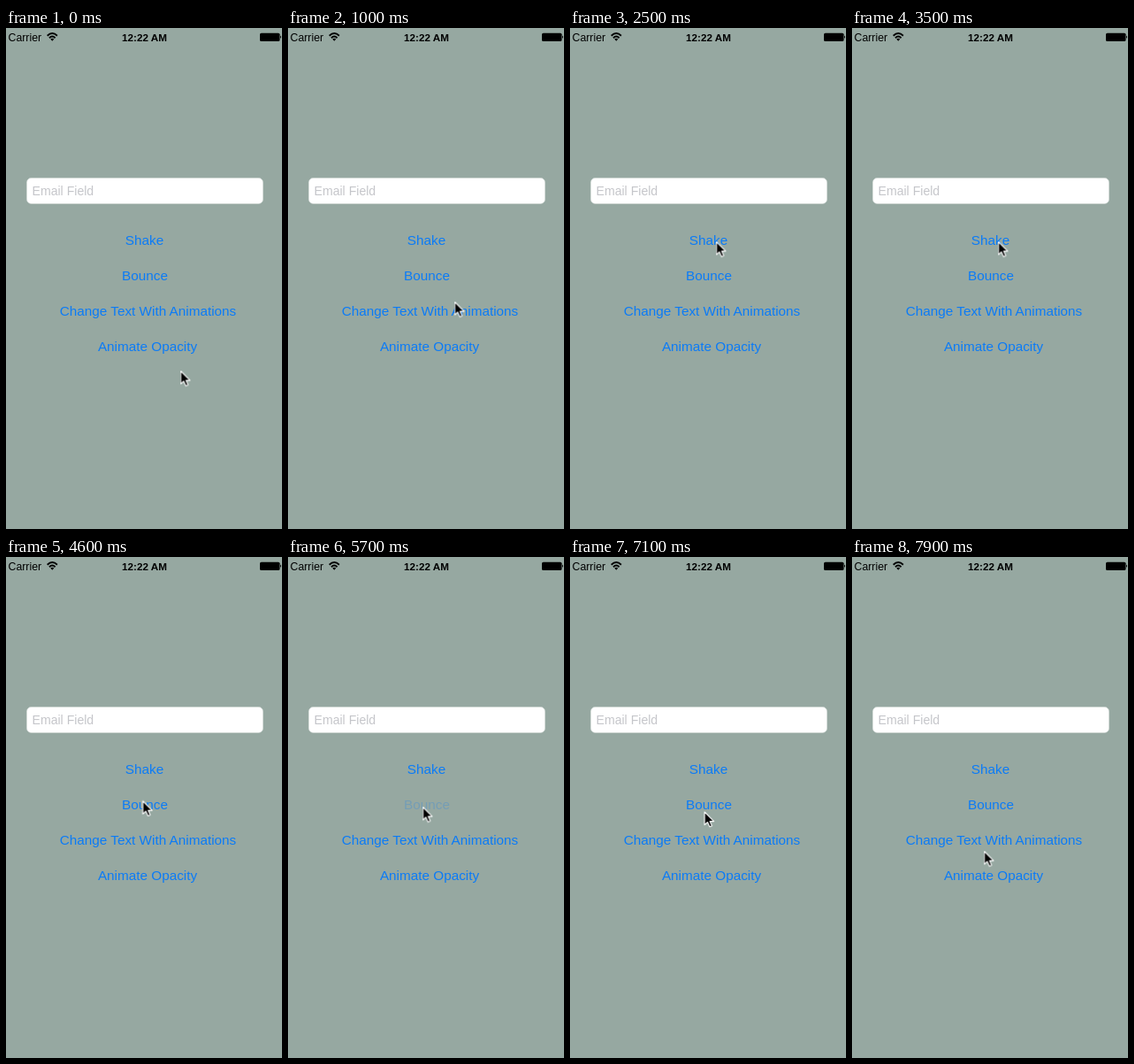
An HTML page for the animation above (8000 ms loop, 312 by 566 pixels).

```html
<!DOCTYPE html>
<html lang="en">
<head>
<meta charset="utf-8">
<title>Text field animations</title>
<style>
  html, body {
    margin: 0;
    width: 100%;
    height: 100%;
    overflow: hidden;
    background: #96a8a1;
  }
  svg {
    display: block;
    width: 312px;
    height: 566px;
    font-family: "Liberation Sans", Arial, Helvetica, sans-serif;
  }
  .status { font-size: 12.3px; }
  .clock { font-size: 11.7px; font-weight: bold; }
  .hint { font-size: 14.1px; fill: #c5c6ca; }
  .button { font-size: 15.3px; fill: #0b7bf7; }
  .clock, .button { text-anchor: middle; }

  .shake { animation: shake 8s linear infinite; }
  .bounce { animation: bounce 8s step-end infinite; }
  .tap { animation: tap 8s step-end infinite; }
  .tap.late { animation-delay: 2.9s; }
  .cursor { animation: move 8s infinite; }

  @keyframes shake {
    0%, 35.62% { transform: translateX(0); }
    35.625%, 37.5% { transform: translateX(-20px); }
    36.5625%, 38.4375% { transform: translateX(20px); }
    39.375% { transform: translateX(-10px); }
    40.3125% { transform: translateX(10px); }
    41.25% { transform: translateX(-5px); }
    42.1875% { transform: translateX(5px); }
    43.125%, 100% { transform: translateX(0); }
  }
  @keyframes bounce {
    0% { transform: translateY(0); }
    73.75% { transform: translateY(-5px); }
    75% { transform: translateY(3px); }
    76.25% { transform: translateY(9px); }
    77.5%, 100% { transform: translateY(0); }
  }
  @keyframes tap {
    0% { opacity: 1; }
    35% { opacity: .24; }
    36.25% { opacity: .5; }
    37.5% { opacity: .8; }
    38.75%, 100% { opacity: 1; }
  }
  /* The pointer advances once every 100 ms. */
  @keyframes move {
    0% { transform: translate(197.5px, 387.5px); animation-timing-function: step-end; }
    5% { transform: translate(197.5px, 387.5px); animation-timing-function: steps(6); }
    12.5% { transform: translate(188.5px, 309.5px); animation-timing-function: steps(3); }
    16.25% { transform: translate(187px, 305px); animation-timing-function: steps(9); }
    27.5% { transform: translate(166.5px, 243px); animation-timing-function: steps(3); }
    31.25% { transform: translate(165.5px, 241.5px); animation-timing-function: step-end; }
    51.25% { transform: translate(165.5px, 241.5px); animation-timing-function: steps(6); }
    58.75% { transform: translate(152.5px, 282.5px); animation-timing-function: step-end; }
    87.5% { transform: translate(152.5px, 282.5px); animation-timing-function: steps(9); }
    98.75%, 100% { transform: translate(149.5px, 332.5px); }
  }
</style>
</head>
<body>
<svg viewBox="0 0 312 566">
  <rect width="312" height="566" fill="#96a8a1"/>

  <text class="status" x="2.5" y="15">Carrier</text>
  <g fill="none" stroke="#000" stroke-width="1.9">
    <path d="M46.7 8.8Q52.3 3.4 57.9 8.8"/>
    <path d="M49 11.2Q52.3 8 55.6 11.2"/>
  </g>
  <path d="M50.3 12.6Q52.3 10.9 54.3 12.6L52.3 14.8Z"/>
  <text class="clock" x="156.5" y="14.6">12:22 AM</text>
  <rect x="287" y="5.7" width="22.5" height="9.3" rx="1.6"/>
  <path d="M310 8.6Q312 10.3 310 12Z"/>

  <g class="shake">
    <g class="bounce">
      <rect x="23.5" y="169.5" width="267" height="29" rx="5" fill="#fff" stroke="#d3dad7" stroke-width=".6"/>
      <text class="hint" x="29.5" y="189">Email Field</text>
    </g>
  </g>

  <g class="button">
    <text class="tap" x="156.5" y="245">Shake</text>
    <text class="tap late" x="157" y="285">Bounce</text>
    <text x="160.5" y="325">Change Text With Animations</text>
    <text x="160" y="365">Animate Opacity</text>
  </g>

  <g class="cursor">
    <path d="M0 0V14.6L3.4 11.5L5.8 16.8L8.3 15.7L6 10.6H10.5Z" stroke="#fff" stroke-width="1.1" stroke-linejoin="round"/>
  </g>
</svg>
</body>
</html>
```
